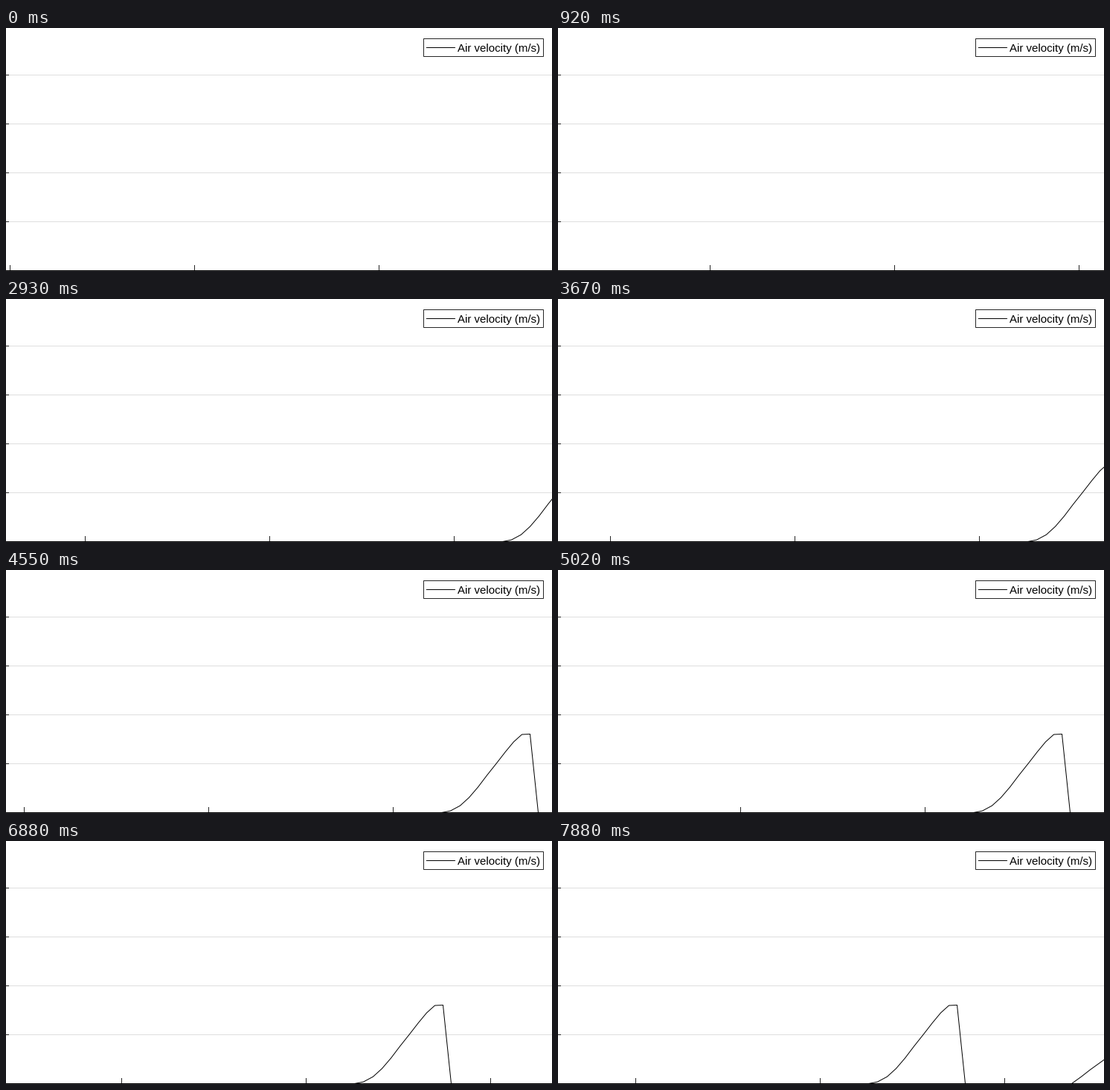
Write a matplotlib script that moves like this. It is 734x328 px and loops after 8 s.

```python
import numpy as np
import matplotlib.pyplot as plt
from matplotlib.animation import FuncAnimation
from matplotlib.patches import Rectangle

W, H, DPI = 734, 328, 64
PX = 72 / DPI            # points per pixel
INTERVAL, LOOP = 20, 8000
BASE = 327.5             # zero level of the plot
NOW = 728.5              # where the newest sample enters
TICK_GAP = 248
DARK, GRID = "#262626", "#dedede"

plt.rcParams["path.snap"] = False

# samples arrive at a steady beat with a few short pauses
n = np.arange(34)
PAUSES = [2, 6, 11, 19, 22, 25, 28, 31]
times = 130 + 230 * (n[1:] - 1) + 70 * np.searchsorted(PAUSES, n[1:], side="right")

# pixels scrolled at each sample; the speed drifts slightly
offsets = np.round(np.interp(n, [0, 14, 18, 24, 33], [0, 172, 216, 295, 410]))

# air velocity in pixels: a clipped sine-squared puff, then a steady rise
puff = np.minimum(106, 112.5 * np.sin(0.1465 * (n - 7)) ** 2)
levels = np.where((n >= 7) & (n <= 17), puff, 9.4 * np.maximum(0, n - 29))

fig = plt.figure(figsize=(W / DPI, H / DPI), dpi=DPI, facecolor="white")
ax = fig.add_axes([0, 0, 1, 1])
ax.set_xlim(0, W)
ax.set_ylim(H, 0)
ax.axis("off")


def hline(y, x0, x1, color, zorder=2):
    ax.plot([x0, x1], [y, y], color=color, lw=PX, solid_capstyle="butt",
            zorder=zorder)


for y in np.arange(63.5, 300, 66):
    hline(y, 0, W, GRID)
    hline(y, 0, 4, DARK)
hline(BASE, 0, W, "black")

ticks = ax.vlines([], 320, 327, colors=DARK, lw=PX)
curve, = ax.plot([], [], color="black", lw=PX)

# legend
ax.add_patch(Rectangle((561.5, 14.5), 161, 24, fc="white", ec=DARK, lw=PX,
                       joinstyle="miter", zorder=4))
hline(26.5, 565, 604, "black", zorder=5)
ax.text(607, 32, "Air velocity (m/s)", family="Liberation Sans",
        size=15 * PX, color="black", va="baseline", zorder=5)


def update(frame):
    t = (frame + 0.5) * INTERVAL
    offset = offsets[np.searchsorted(times, t, side="right")]
    tick_x = 5.5 + TICK_GAP * np.arange(6) - offset
    ticks.set_segments([[(x, 320), (x, 327)] for x in tick_x])
    curve.set_data(NOW + offsets - offset, BASE - levels)
    return ticks, curve


anim = FuncAnimation(fig, update, frames=LOOP // INTERVAL, interval=INTERVAL,
                     repeat=True, repeat_delay=0, blit=False)
plt.show()
```
